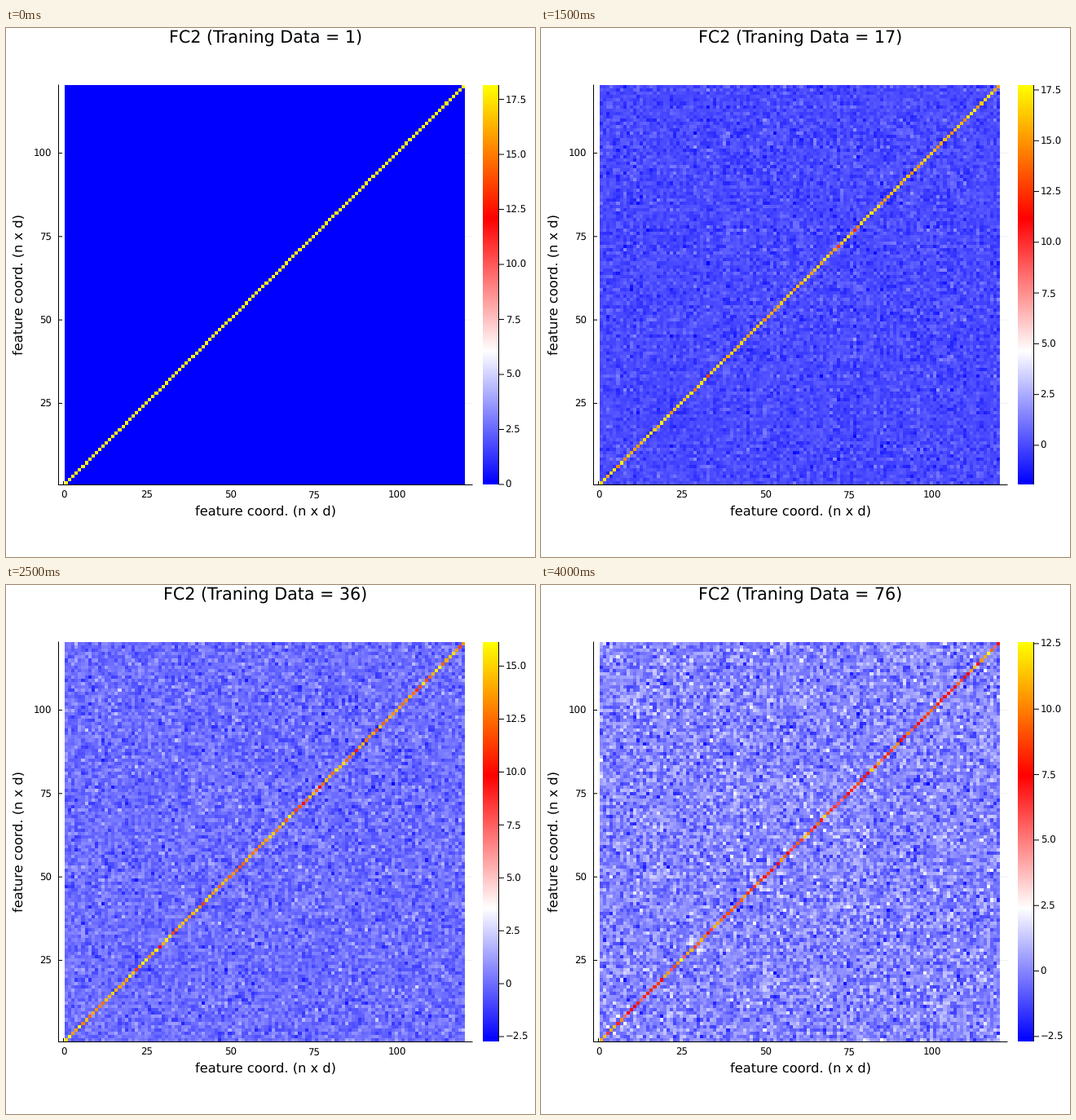
A matplotlib script for the animation above (4500 ms loop, 649 by 649 pixels).

```python
import numpy as np
import matplotlib.pyplot as plt
from matplotlib.animation import FuncAnimation
from matplotlib.collections import LineCollection
from matplotlib.colors import LinearSegmentedColormap

plt.rcParams["font.family"] = "DejaVu Sans"
plt.rcParams["text.hinting"] = "none"

SIZE, DPI = 649, 100
CELLS, DIM, STIFF = 120, 140, 18.15
LEFT, RIGHT, TOP, BOTTOM = 72, 563, 70, 560
TITLE_PX, LABEL_PX, TICK_PX = 20.6, 16.25, 11.8

# training samples, colour range low and high
STEPS = [(1, 0, 18.15), (5, -1.37, 18.12), (10, -1.7, 17.95),
         (17, -1.93, 17.74), (26, -2.3, 17.0), (36, -2.73, 16.14),
         (48, -3.31, 15.44), (61, -3.05, 14.1), (76, -2.69, 12.56)]


def make_basis():
    """Orthonormal directions that the samples take away one by one."""
    rng = np.random.default_rng(12)
    a = rng.normal(size=(DIM, DIM))
    a *= np.exp(rng.normal(0, 0.18, size=(DIM, 1)))
    a[[11, 60], :4] *= 1.8
    a[32, :16] *= 2
    a[76, 4:16] *= 2
    a[87, 16:36] *= 1.6
    return np.linalg.qr(a)[0][:CELLS]


basis = make_basis()


def matrix(samples):
    q = basis[:, :samples - 1]
    return STIFF * (np.eye(CELLS) - q @ q.T)


def px(size):
    return size * 72 / DPI


def x_pos(v):
    return 70.5 + 4.093 * v


def y_pos(v):
    return 562.8 - 4.093 * v


fig = plt.figure(figsize=(SIZE / DPI, SIZE / DPI), dpi=DPI, facecolor="white")
ax = fig.add_axes([0, 0, 1, 1])
ax.axis("off")
cmap = LinearSegmentedColormap.from_list(
    "heat", ["blue", "white", "red", "yellow"], N=768)


def line(x0, y0, x1, y1, **style):
    ax.plot([x0, x1], [y0, y1], **{"color": "black", "lw": px(1), "zorder": 3,
                                   "solid_capstyle": "butt", "snap": False,
                                   **style})


def label(x, y, text, size, ha="center", **style):
    return ax.text(x, y, text, fontsize=px(size), ha=ha, va="baseline", **style)


heat = ax.imshow(matrix(1), cmap=cmap, origin="lower", aspect="auto",
                 interpolation="nearest", extent=(LEFT, RIGHT, BOTTOM, TOP),
                 zorder=2)
ax.imshow(np.linspace(0, 1, 490)[:, None], cmap=cmap, origin="lower",
          aspect="auto", interpolation="nearest",
          extent=(585, 604, BOTTOM, TOP), zorder=2)
ax.set(xlim=(0, SIZE), ylim=(SIZE, 0))

line(64.5, 69.5, 64.5, 561)
line(64, 560.5, 572.5, 560.5)
line(604.5, TOP, 604.5, BOTTOM)
for v in range(0, 101, 25):
    x, y = x_pos(v), y_pos(v)
    line(x, TOP, x, BOTTOM, alpha=0.06, zorder=1)
    line(x, 556, x, BOTTOM, zorder=1)
    label(x, 577.3, str(v), TICK_PX)
    if v:
        line(64.5, y, 572.5, y, alpha=0.06, zorder=1)
        line(64.5, y, 69, y, zorder=1)
        label(56.3, y + 4.3, str(v), TICK_PX, ha="right")

label(319, 598, "feature coord. (n x d)", LABEL_PX)
label(20.7, 314.7, "feature coord. (n x d)", LABEL_PX, rotation=90,
      rotation_mode="anchor")
title = label(318.5, 18.2, "", TITLE_PX)
bar_ticks = LineCollection([], colors="black", linewidths=px(1), zorder=3)
bar_ticks.set_snap(False)
ax.add_collection(bar_ticks, autolim=False)
bar_labels = [label(612.6, 0, "", TICK_PX, ha="left") for _ in range(10)]


def tick_text(v):
    return f"{v:.1f}".replace("-", "\u2212") if v else "0"


def update(i):
    samples, low, high = STEPS[i]
    title.set_text(f"FC2 (Traning Data = {samples})")
    heat.set_data(matrix(samples))
    heat.set_clim(low, high)
    values = [v for v in np.arange(-2.5, 18, 2.5) if low <= v <= high]
    ys = [BOTTOM - (BOTTOM - TOP) * (v - low) / (high - low) for v in values]
    bar_ticks.set_segments([[(604.5, y), (611, y)] for y in ys])
    for text in bar_labels:
        text.set_text("")
    for text, v, y in zip(bar_labels, values, ys):
        text.set_text(tick_text(v))
        text.set_y(y + 4.3)
    return [title, heat, bar_ticks, *bar_labels]


anim = FuncAnimation(fig, update, frames=len(STEPS), interval=500,
                     init_func=lambda: update(0), repeat=True, repeat_delay=0)
plt.show()
```
